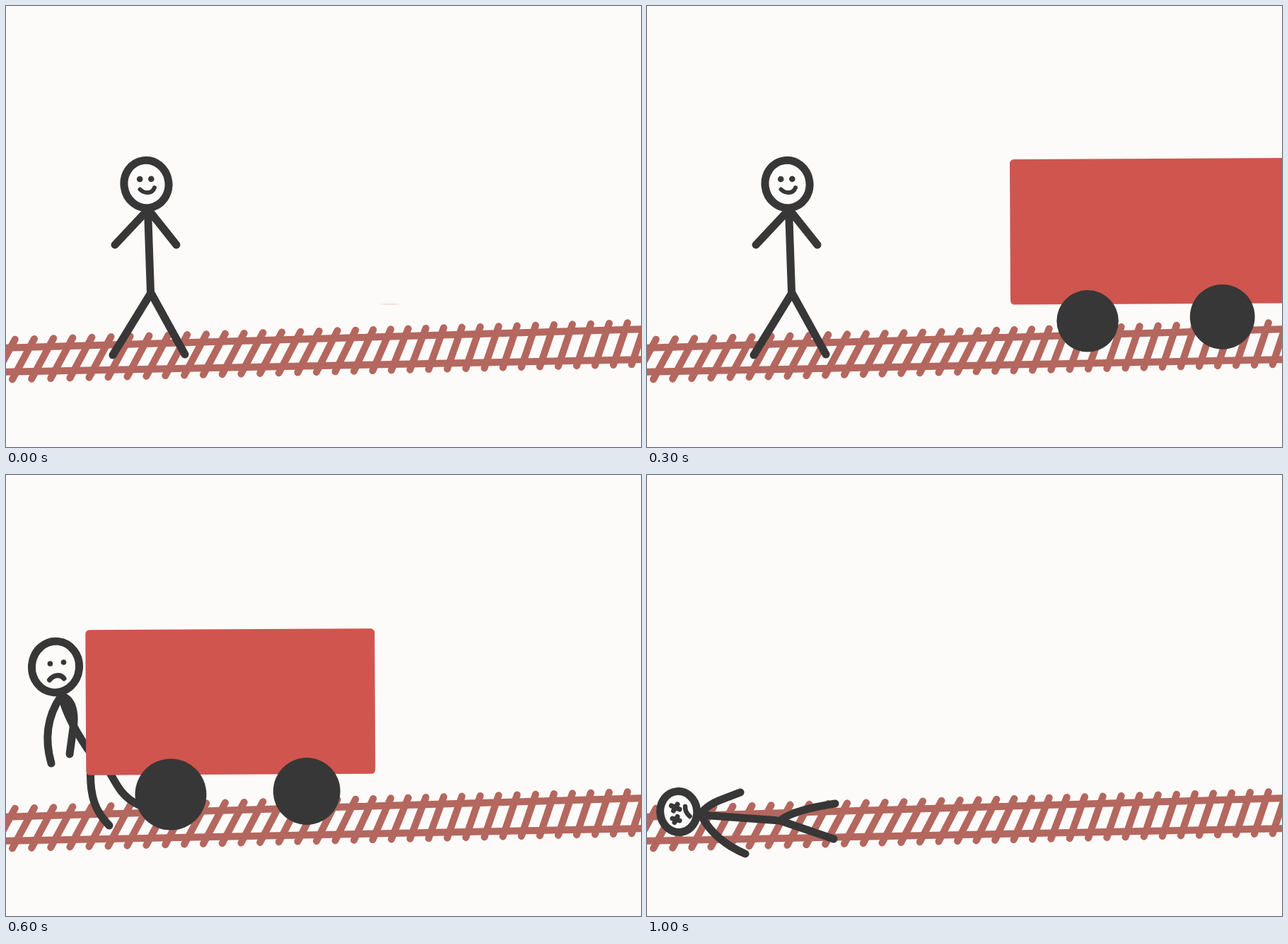
Animation, 898 px wide and 624 px high, one loop 1500 ms. Source, as an HTML page:

```html
<!DOCTYPE html>
<html lang="en">
<head>
<meta charset="utf-8">
<title>Trolley</title>
<style>
  html, body { margin: 0; width: 100%; height: 100%; overflow: hidden; background: #fcfbf9; }
  svg { display: block; width: 100vw; height: 100vh; }
  .track { fill: none; stroke: #b4675e; stroke-width: 10; stroke-linecap: round; }
  .man { fill: none; stroke: #373737; stroke-width: 11; stroke-linecap: round; stroke-linejoin: round; }
  .man ellipse { fill: #fcfbf9; }
  .man circle { fill: #373737; stroke: none; }
  #box { fill: #d0554f; stroke: #d0554f; stroke-width: 11; stroke-linejoin: round; }
  .wheel { fill: #373737; }
</style>
</head>
<body>
<svg viewBox="0 0 898 624" xmlns="http://www.w3.org/2000/svg">
  <g class="track">
    <path id="sleepers"/>
    <path d="M-8 484 L906 457 M-8 518 L906 500"/>
  </g>
  <path id="sliver" d="M527 422 Q544 420.5 560 422 Q544 423 527 422Z" fill="#f0c9c6"/>

  <g id="happy" class="man">
    <ellipse cx="198.5" cy="252" rx="31.5" ry="33.7" transform="rotate(-8 198.5 252)"/>
    <circle cx="189.2" cy="245" r="4.3"/>
    <circle cx="205.3" cy="244.7" r="4.3"/>
    <path d="M189.5 259.5 Q194 264 200 264 Q207.5 264 210 257" stroke-width="6"/>
    <path d="M200.5 288 L204.5 405 M200 289 L154 338 M202 289 L241 338 M205 406 L151 494 M205 406 L253 493"/>
  </g>

  <g id="sad" class="man">
    <ellipse cx="70" cy="271.5" rx="33.5" ry="36.3" transform="rotate(6 70 271.5)"/>
    <circle cx="62.4" cy="267" r="3.8"/>
    <circle cx="81.5" cy="265" r="3.8"/>
    <path d="M61.5 290 C67 283 77 281 82 288" stroke-width="7"/>
    <path d="M77 314 C55 347 56 380 64 408 M82 314 C98 322 97 347 95 358 L90 395"/>
    <path d="M79 314 C86 342 101 366 113 384 L128 405 M120 410 C117 455 127 477 146 496 M138 405 C157 440 164 456 188 467"/>
  </g>

  <g id="lying" class="man">
    <path d="M77 478 C90 462 110 458 132 449 M77 482 C90 508 115 526 139 536"/>
    <path d="M76 481 L188 489 C205 476 235 470 266 465 M188 489 L264 515"/>
    <ellipse cx="44.7" cy="476.5" rx="26" ry="29" transform="rotate(-5 44.7 476.5)"/>
    <path d="M34.5 468 L46 473 M43 466 L37.5 475 M36 486 L46 489 M43 483.5 L39 491.5" stroke-width="7"/>
    <path d="M54 469 Q53.5 477 60.5 483" stroke-width="6.5"/>
  </g>

  <g id="train">
    <path id="box" d="M5.5 5.5 L403.5 3.5 L404.5 198 L6.5 200Z"/>
    <circle id="front" class="wheel"/>
    <circle id="back" class="wheel"/>
  </g>
</svg>
<script>
const STEP = 100, LOOP = 1500, IMPACT = 6, GONE = 10;
const byId = id => document.getElementById(id);

// Sleepers lean right, steeper towards the far end of the track.
function sleeper(i) {
  const foot = 9 + 27.2 * i - 0.02 * i * i;
  const head = foot + 25.5 - 5.5 * Math.tanh((i - 19) / 3);
  return `M${foot} ${528.5 - 0.024 * foot} L${head} ${472 - 0.027 * head}`;
}
byId('sleepers').setAttribute('d', Array.from({ length: 35 }, (_, i) => sleeper(i - 1)).join(' '));

// Key points start with their step; the wheels sit relative to the box in x.
const boxPath = [[1, 785, 217], [4, 377, 217], [5, 242.7, 218], [6, 112.3, 219.3], [9, -310, 218]];
const frontPath = [[2, 108.5, 445.4, 43], [4, 111.7, 446.3, 44.5], [5, 119.8, 446, 47.7], [6, 120.7, 452, 50.5]];
const backPath = [[4, 300.7, 439.8, 45.9], [5, 313, 442.2, 47.5], [6, 313, 447.5, 47.4], [8, 290.6, 451.5, 49.2]];

function along(path, step) {
  const next = path.findIndex(key => key[0] >= step);
  if (next < 0) return path[path.length - 1].slice(1);
  const from = path[Math.max(0, next - 1)], to = path[next];
  const part = from === to ? 0 : (step - from[0]) / (to[0] - from[0]);
  return to.slice(1).map((value, i) => from[i + 1] + (value - from[i + 1]) * part);
}

function show(id, visible) {
  byId(id).style.display = visible ? '' : 'none';
}

function placeWheel(id, boxX, [offset, cy, r]) {
  const wheel = byId(id);
  wheel.setAttribute('cx', boxX + offset);
  wheel.setAttribute('cy', cy);
  wheel.setAttribute('r', r);
}

function draw(time) {
  const step = Math.floor((time % LOOP) / STEP);
  show('sliver', step === 0);
  show('happy', step < IMPACT);
  show('sad', step === IMPACT);
  show('lying', step > IMPACT);
  show('train', step > 0 && step < GONE);
  const [x, y] = along(boxPath, step);
  byId('box').setAttribute('transform', `translate(${x} ${y})`);
  placeWheel('front', x, along(frontPath, step));
  placeWheel('back', x, along(backPath, step));
}

const start = performance.now();
function tick() {
  draw(performance.now() - start);
  requestAnimationFrame(tick);
}
tick();
</script>
</body>
</html>
```
